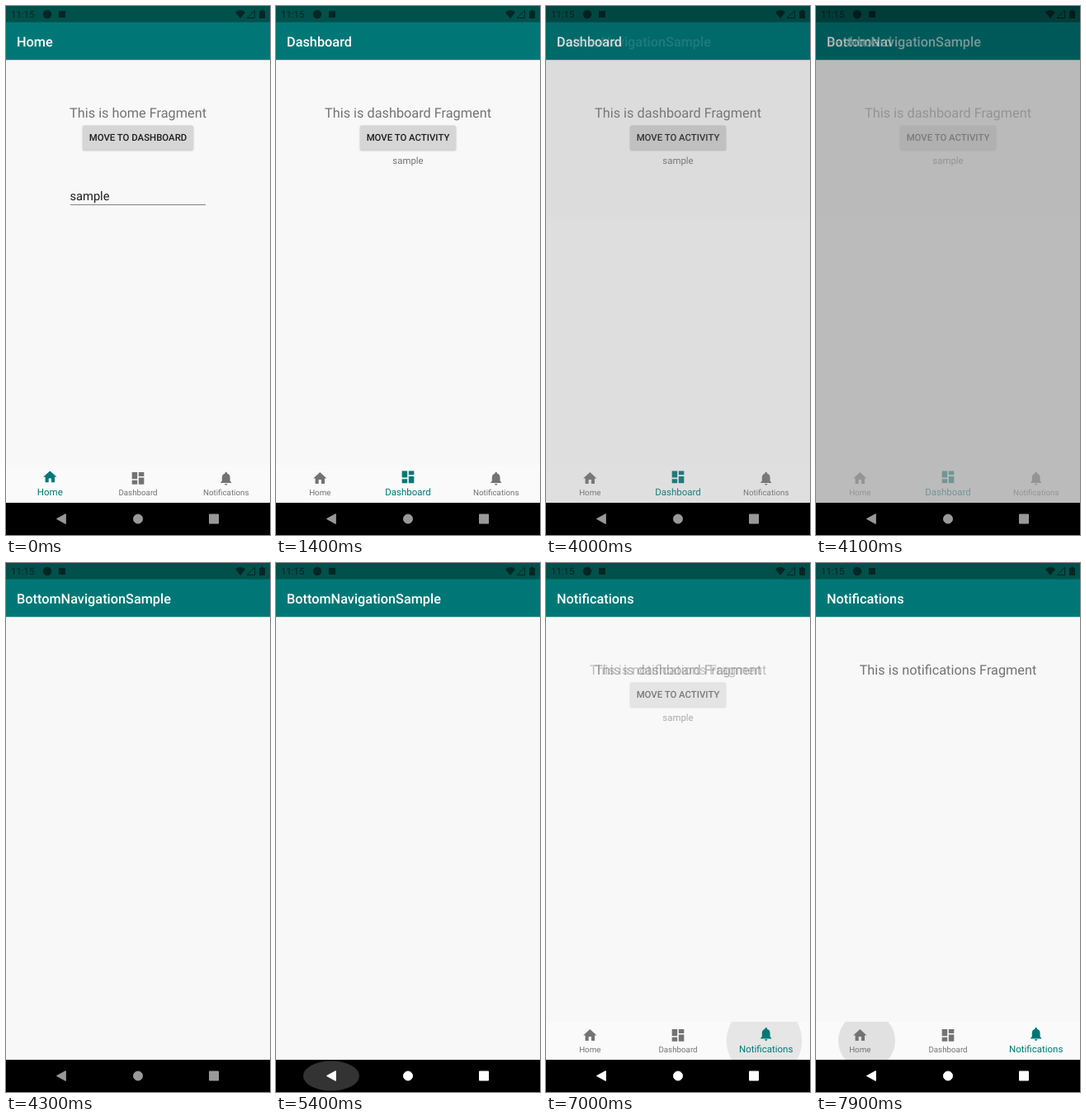
These frames come from a looping animation (320 by 640 pixels, 8000 ms). An HTML page:

```html
<!DOCTYPE html>
<html lang="en">
<head>
<meta charset="utf-8">
<title>Bottom navigation</title>
<style>
  html, body { margin: 0; width: 100%; height: 100%; overflow: hidden; background: #000; }
  svg { display: block; width: 320px; height: 640px; font-family: Roboto, sans-serif; text-rendering: geometricPrecision; }
  .title { font-size: 16.3px; font-weight: 500; fill: #fff; }
  .mid { text-anchor: middle; }
  .lead { font-size: 16.3px; fill: #737373; }
  .caps { font-size: 11.4px; font-weight: 500; fill: #1e1e1e; }
  .button { fill: #d6d6d6; filter: drop-shadow(0 1px 1px rgba(0, 0, 0, .25)); }
</style>
</head>
<body>
<svg viewBox="0 0 320 640">
  <defs>
    <clipPath id="homeClip"><rect x="93" y="144.5" width="134" height="29.3" rx="1.6"/></clipPath>
    <clipPath id="dashClip"><rect x="102" y="144.5" width="116" height="29.3" rx="1.6"/></clipPath>
    <clipPath id="tabClip"><rect y="555" width="320" height="46"/></clipPath>
    <clipPath id="sysClip"><rect y="601" width="320" height="39"/></clipPath>
    <g id="frame">
      <rect width="320" height="601" fill="#f8f8f8"/>
      <rect y="65" width="320" height="1" fill="#ebebeb"/>
      <rect width="320" height="65.2" fill="#007777"/>
      <rect width="320" height="19.6" fill="#00504b"/>
      <g fill="#042625">
        <text x="6" y="14.3" font-size="11.4">11:15</text>
        <circle cx="50" cy="10" r="5.2"/>
        <rect x="64" y="6" width="8" height="8"/>
        <path d="M278 7.4q6-4.6 12 0L284 15z"/>
        <path d="M301.5 5.3v9.2h-9.2z" fill="none" stroke="#042625"/>
        <path d="M307 6h2V4.8h3V6h2v9h-7z"/>
      </g>
    </g>
  </defs>

  <rect width="320" height="640"/>

  <g id="main">
    <use href="#frame"/>
    <text id="title" class="title" x="13" y="49"></text>

    <g id="home">
      <text class="lead mid" x="160" y="135">This is home Fragment</text>
      <rect class="button" x="93" y="144.5" width="134" height="29.3" rx="1.6"/>
      <g clip-path="url(#homeClip)"><circle id="homeRipple" cy="159"/></g>
      <text class="caps mid" x="160" y="163.3">MOVE TO DASHBOARD</text>
      <text x="77.5" y="234.5" font-size="14.67" fill="#1e1e1e">sample</text>
      <rect x="78" y="240" width="164" height="1" fill="#848484"/>
    </g>

    <g id="dash">
      <text class="lead mid" x="160" y="135">This is dashboard Fragment</text>
      <rect class="button" x="102" y="144.5" width="116" height="29.3" rx="1.6"/>
      <g clip-path="url(#dashClip)"><circle id="dashRipple" cy="159"/></g>
      <text class="caps mid" x="160" y="163.3">MOVE TO ACTIVITY</text>
      <text class="mid" x="160" y="191" font-size="11.4" fill="#737373">sample</text>
    </g>

    <text id="note" class="lead mid" x="160" y="135">This is notifications Fragment</text>

    <rect y="555" width="320" height="46" fill="#fafafa"/>
    <g clip-path="url(#tabClip)">
      <circle id="noteRipple" cy="578"/>
      <circle id="backHomeRipple" cy="578"/>
    </g>
    <g id="tabs"></g>
  </g>

  <g id="activity">
    <use href="#frame"/>
    <text class="title" x="13" y="49">BottomNavigationSample</text>
  </g>

  <g clip-path="url(#sysClip)"><ellipse id="backRipple" cx="67" cy="620.5" fill="#fff"/></g>
  <g id="sys" stroke-width="1" stroke-linejoin="round">
    <path d="M61.5 620.5 72.3 614.6v11.8z"/>
    <circle cx="160" cy="620.5" r="5.5"/>
    <rect x="246.5" y="615" width="11" height="11"/>
  </g>
</svg>
<script>
const $ = id => document.getElementById(id);
const set = (el, attrs) => { for (const k in attrs) el.setAttribute(k, attrs[k]); };
const ramp = (t, start, length) => Math.min(1, Math.max(0, (t - start) / length));
const mix = (a, b, k) => a + (b - a) * k;

const LOOP = 8000, STEP = 100, FADE = 400;
const PRESS_HOME = 500, TO_DASH = 940, PRESS_DASH = 3500, OPEN = 3910;
const PRESS_BACK = 5200, CLOSE = 5550, PRESS_NOTE = 6700, TO_NOTE = 6820, PRESS_TAB = 7700;

// Screen changes speed up, then slow down
const fade = (t, start) => (1 - Math.cos(Math.PI * ramp(t, start, FADE))) / 2;

const tabs = [
  ['Home', 'M10 20v-6h4v6h5v-8h3L12 3 2 12h3v8z'],
  ['Dashboard', 'M3 13h8V3H3zm0 8h8v-6H3zm10 0h8V11h-8zm0-18v6h8V3z'],
  ['Notifications', 'M12 22c1.1 0 2-.9 2-2h-4c0 1.1.9 2 2 2zm6-6v-5c0-3.1-1.6-5.6-4.5-6.3V4c0-.8-.7-1.5-1.5-1.5s-1.5.7-1.5 1.5v.7C7.6 5.4 6 7.9 6 11v5l-2 2v1h16v-1l-2-2z']
];
const tabX = i => 53.3 + i * 106.7;
$('tabs').innerHTML = tabs.map(([name, path], i) =>
  `<g><path d="${path}"/><text class="mid" x="${tabX(i)}" y="592.3">${name}</text></g>`).join('');

function drawTab(i, k) {
  const group = $('tabs').children[i], [icon, label] = group.children;
  set(group, { fill: k > .4 ? '#007777' : '#737373' });
  set(icon, { transform: `translate(${tabX(i)} ${mix(571.4, 569.8, k)}) scale(.8148) translate(-12 -12)` });
  set(label, { 'font-size': mix(9.78, 11.5, k) });
}

function pressButton(id, age) {
  const k = ramp(age, 0, 225);
  const alpha = age < 0 ? 0 : .07 * (1 - ramp(age, 300, 250));
  set($(id), { cx: mix(182, 160, k), r: mix(38, 75, k), opacity: alpha });
}

function pressTab(id, age, from, to) {
  const alpha = age < 0 ? 0 : .1 * (1 - ramp(age, 250, 250));
  set($(id), { cx: mix(from, to, ramp(age, 0, 400)), r: mix(12, 57, ramp(age, 0, 400)), opacity: alpha });
}

function draw(t) {
  const toDash = fade(t, TO_DASH), toNote = fade(t, TO_NOTE);
  set($('home'), { opacity: 1 - toDash });
  set($('dash'), { opacity: toDash * (1 - toNote) });
  set($('note'), { opacity: toNote });
  $('title').textContent = tabs[t < TO_DASH ? 0 : t < TO_NOTE ? 1 : 2][0];

  const dashOn = ramp(t, TO_DASH, 115), noteOn = ramp(t, TO_NOTE, 115);
  [1 - dashOn, dashOn - noteOn, noteOn].forEach((k, i) => drawTab(i, k));

  pressButton('homeRipple', t - PRESS_HOME);
  pressButton('dashRipple', t - PRESS_DASH);
  pressTab('noteRipple', t - PRESS_NOTE, 258, 266.7);
  pressTab('backHomeRipple', t - PRESS_TAB, 70, 53);

  // Opening fades both screens over black; closing uncovers the first one
  const opened = fade(t, OPEN);
  set($('main'), { opacity: t < CLOSE ? 1 - opened : 1 });
  set($('activity'), { opacity: opened * (1 - ramp(t, CLOSE, 100)) });

  const age = t - PRESS_BACK, grow = ramp(age, -50, 250);
  set($('backRipple'), { rx: 34 * grow, ry: 18 * grow, opacity: age < 0 ? 0 : .2 * (1 - ramp(age, 250, 300)) });
  const color = age < 0 ? '#999' : '#fff';
  set($('sys'), { fill: color, stroke: color });
}

const begin = performance.now();
function tick() {
  const t = (performance.now() - begin) % LOOP;
  draw(Math.floor(t / STEP) * STEP);
  requestAnimationFrame(tick);
}
tick();
</script>
</body>
</html>
```
